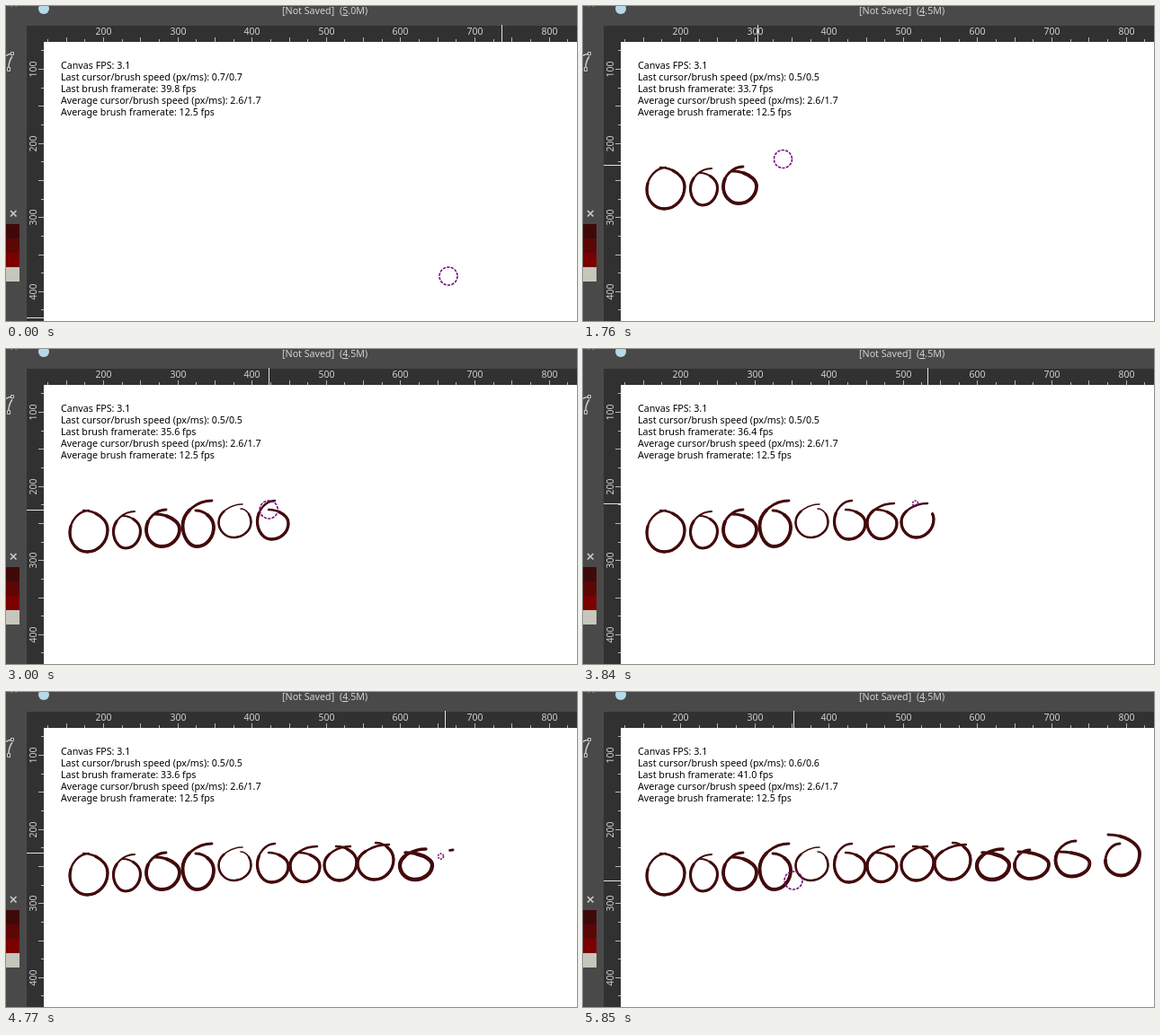
These frames come from a looping animation (635 px wide and 351 px high, 5920 ms). An HTML page:

```html
<!DOCTYPE html>
<html lang="en">
<head>
<meta charset="utf-8">
<title>Brush strokes</title>
<style>
  html, body { margin: 0; width: 100%; height: 100%; overflow: hidden; background: #fff; }
  svg { display: block; width: 635px; height: 351px; }
  text { font: 10.7px "Noto Sans", "Open Sans", sans-serif; white-space: pre; }
  .ruler { font-size: 10.5px; fill: #d0d0d0; text-anchor: middle; }
  .title { fill: #d2d2d2; }
  .ink { fill: none; stroke: #430a0c; stroke-linecap: round; }
  .tick { stroke: #b8b8b8; shape-rendering: crispEdges; }
  .mark { stroke: #e2e2e2; shape-rendering: crispEdges; }
</style>
</head>
<body>
<svg viewBox="0 0 635 351">
  <rect width="635" height="351" fill="#fff"/>
  <g id="ink"></g>
  <g id="info"></g>
  <circle id="cursor" fill="none" stroke="#70107a" stroke-width="1.6"/>
  <path d="M0 0H635V22H23V351H0Z" fill="#494949"/>
  <path d="M23 22H635V40H42V351H23Z" fill="#313131"/>
  <g id="rulers"></g>
  <line id="markX" class="mark" y1="21" y2="40"/>
  <line id="markY" class="mark" x1="23" x2="42"/>
  <circle cx="42" cy="3" r="6" fill="#b5d9e8"/>
  <text class="title" x="307" y="9">[Not Saved]</text>
  <text class="title" x="371" y="9">(<tspan id="size" text-decoration="underline">5</tspan><tspan id="sizeRest">.0M)</tspan></text>
  <g fill="none" stroke="#c9c9c9">
    <path d="M5.5 0h1.5M10.5 0h1.5"/>
    <path d="M5 228l6.5 6.5M11.5 228l-6.5 6.5" stroke-width="1.7"/>
    <path d="M0 55.5Q3 53 6 53.5M7 56Q3 62 3 68" stroke-width="1.5"/>
    <path d="M5.500 51.500h3v3h-3zM1.500 68.500h3v4h-3z"/>
  </g>
  <g id="swatches"></g>
</svg>
<script>
const LOOP = 5920, STEP = 76.9, LAST = 76;
const REST = [492, 301], REST_MARK = [551, 347], AWAY = [234, 210];

// start x, y, end x, y, left, right, bottom, weight, first step, last step
const STROKES = [
  [92, 180, 86, 180, 71, 113, 226, 3, 10, 15],
  [143, 181, 130, 186, 119.5, 149.5, 222, 2.8, 16.5, 19],
  [178, 179, 166, 184, 156, 193, 220, 3.5, 19.8, 21.8],
  [229, 169, 211, 180, 196.5, 231, 220, 3.5, 23.3, 27.6],
  [263, 173, 261, 178, 236.5, 272.5, 210, 2.2, 30, 34],
  [299, 169, 292, 179, 279.5, 314, 212, 3, 35.5, 38.9],
  [346, 172, 326, 179, 316, 349, 211.5, 3, 41.5, 45],
  [383, 172, 367, 172, 354, 390, 210, 3, 46.8, 50.8],
  [426, 170, 411, 168, 391, 431, 209, 3, 52, 55],
  [467, 175, 444, 179, 438, 474, 209, 4, 57, 60.6],
  [497, 176, 484, 178, 480, 518, 208, 3.5, 61.9, 65.4],
  [548, 166, 530, 178, 525.5, 563.5, 205.5, 3.5, 66.8, 70.5],
  [597, 169, 584, 159, 581, 619, 204.5, 3.5, 71.8, 74.6]
];
const RATES = ["39.8", "35.1", "34.4", "33.7", "34.8", "35.2", "35.6",
  "36.4", "35.0", "34.2", "33.6", "36.8", "38.5", "41.0"];

const $ = id => document.getElementById(id);
const clamp = v => Math.max(0, Math.min(1, v));
const smooth = v => v * v * (3 - 2 * v);
const mix = (a, b, f) => [a[0] + (b[0] - a[0]) * f, a[1] + (b[1] - a[1]) * f];

function add(parent, tag, attrs, text) {
  const el = document.createElementNS("http://www.w3.org/2000/svg", tag);
  for (const key in attrs) el.setAttribute(key, attrs[key]);
  if (text) el.textContent = text;
  return parent.appendChild(el);
}

function set(el, attrs) {
  for (const key in attrs) el.setAttribute(key, attrs[key]);
}

// One counter-clockwise oval through its left, bottom and right extremes.
function ovalPath(sx, sy, ex, ey, left, right, bottom) {
  const K = 0.55;
  const midX = (left + right) / 2 - 1.5;
  const leftY = sy + (bottom - sy) * 0.54;
  const rightY = ey + (bottom - ey) * 0.46;
  return `M${sx} ${sy}
    C${sx - (sx - left) * 0.5} ${sy} ${left} ${leftY - (leftY - sy) * K} ${left} ${leftY}
    C${left} ${leftY + (bottom - leftY) * K} ${midX - (midX - left) * K} ${bottom} ${midX} ${bottom}
    C${midX + (right - midX) * K} ${bottom} ${right} ${rightY + (bottom - rightY) * K} ${right} ${rightY}
    C${right} ${rightY - (rightY - ey) * K} ${ex + (right - ex) * 0.5} ${ey} ${ex} ${ey}`;
}

const strokes = STROKES.map(([sx, sy, ex, ey, left, right, bottom, weight, from, to]) => {
  const d = ovalPath(sx, sy, ex, ey, left, right, bottom);
  const line = width => add($("ink"), "path", { d, class: "ink", pathLength: 1, "stroke-width": width });
  const thin = line(weight - 0.6), heavy = line(weight + 0.3);
  return { start: [sx, sy], end: [ex, ey], from, to, thin, heavy, length: thin.getTotalLength() };
});
strokes[10].mark = [488, 179];

function buildRulers() {
  const g = $("rulers");
  for (let v = 125; v < 850; v += 25) {
    const x = Math.round(108 + (v - 200) * 0.826) + 0.5;
    add(g, "line", { class: "tick", x1: x, x2: x, y1: v % 50 ? 37 : 34.5, y2: 40 });
    if (v % 100 === 0) add(g, "text", { class: "ruler", x, y: 31.5 }, String(v));
  }
  for (let v = 75; v < 450; v += 25) {
    const y = Math.round(70 + (v - 100) * 0.826) + 0.5;
    add(g, "line", { class: "tick", x1: v % 50 ? 39 : 36, x2: 42, y1: y, y2: y });
    if (v % 100 === 0) add(g, "text", { class: "ruler", transform: `translate(34 ${y}) rotate(-90)` }, String(v));
  }
}

buildRulers();
["#3f090a", "#5c0606", "#7c0000", "#c6c6bc"].forEach((fill, i) =>
  add($("swatches"), "rect", { y: 243 + i * 16, width: 15, height: 16, fill }));
const info = [
  "Canvas FPS: 3.1", "", "",
  "Average cursor/brush speed (px/ms): 2.6/1.7",
  "Average brush framerate: 12.5 fps"
].map((line, i) => add($("info"), "text", { x: 61, y: 70 + i * 13 }, line));

function pose(step) {
  const next = strokes.findIndex(s => step < s.to);
  const s = strokes[next];
  if (s && step >= s.from) {
    const p = (step - s.from) / (s.to - s.from);
    const at = s.thin.getPointAtLength(s.length * clamp(p * 1.1 + 0.1));
    return { cursor: [at.x, at.y], mark: s.mark || s.start, radius: 3 };
  }
  const prev = s ? strokes[next - 1] : strokes[strokes.length - 1];
  const begin = prev ? prev.to : 0;
  const finish = s ? s.from : LAST;
  const f = smooth(clamp((step - begin) / (finish - begin)));
  const target = s ? s.start : AWAY;
  const cursor = mix(prev ? prev.end : REST, target, f);
  let mark = cursor;
  if (!prev) mark = mix(REST_MARK, target, f);
  else if (s) mark = mix(prev.end, cursor, 0.5);
  return { cursor, mark, radius: 10 };
}

function draw(ms) {
  const step = Math.min(LAST, Math.floor((ms + 15) / STEP));
  let done = 0;
  for (const s of strokes) {
    const p = clamp((step - s.from) / (s.to - s.from));
    if (p === 1) done++;
    set(s.thin, { "stroke-dasharray": `${p} 2`, visibility: p > 0 ? "visible" : "hidden" });
    set(s.heavy, {
      "stroke-dasharray": `${Math.max(0, Math.min(p, 0.9) - 0.2)} 2`, "stroke-dashoffset": -0.2,
      visibility: p > 0.2 ? "visible" : "hidden"
    });
  }
  const { cursor, mark, radius } = pose(step);
  set($("cursor"), {
    cx: cursor[0], cy: cursor[1], r: radius,
    "stroke-dasharray": radius > 5 ? "3.2 1.3" : "2 1.2"
  });
  const mx = Math.round(mark[0]) + 0.5, my = Math.round(mark[1]) + 0.5;
  set($("markX"), { x1: mx, x2: mx });
  set($("markY"), { y1: my, y2: my });

  const speed = done === 0 ? "0.7" : done < strokes.length ? "0.5" : "0.6";
  info[1].textContent = `Last cursor/brush speed (px/ms): ${speed}/${speed}`;
  info[2].textContent = `Last brush framerate: ${RATES[done]} fps`;
  const started = step >= strokes[0].from;
  $("size").textContent = started ? "4" : "5";
  $("sizeRest").textContent = started ? ".5M)" : ".0M)";
}

const origin = performance.now();
function tick() {
  draw((performance.now() - origin) % LOOP);
  requestAnimationFrame(tick);
}
tick();
</script>
</body>
</html>
```
